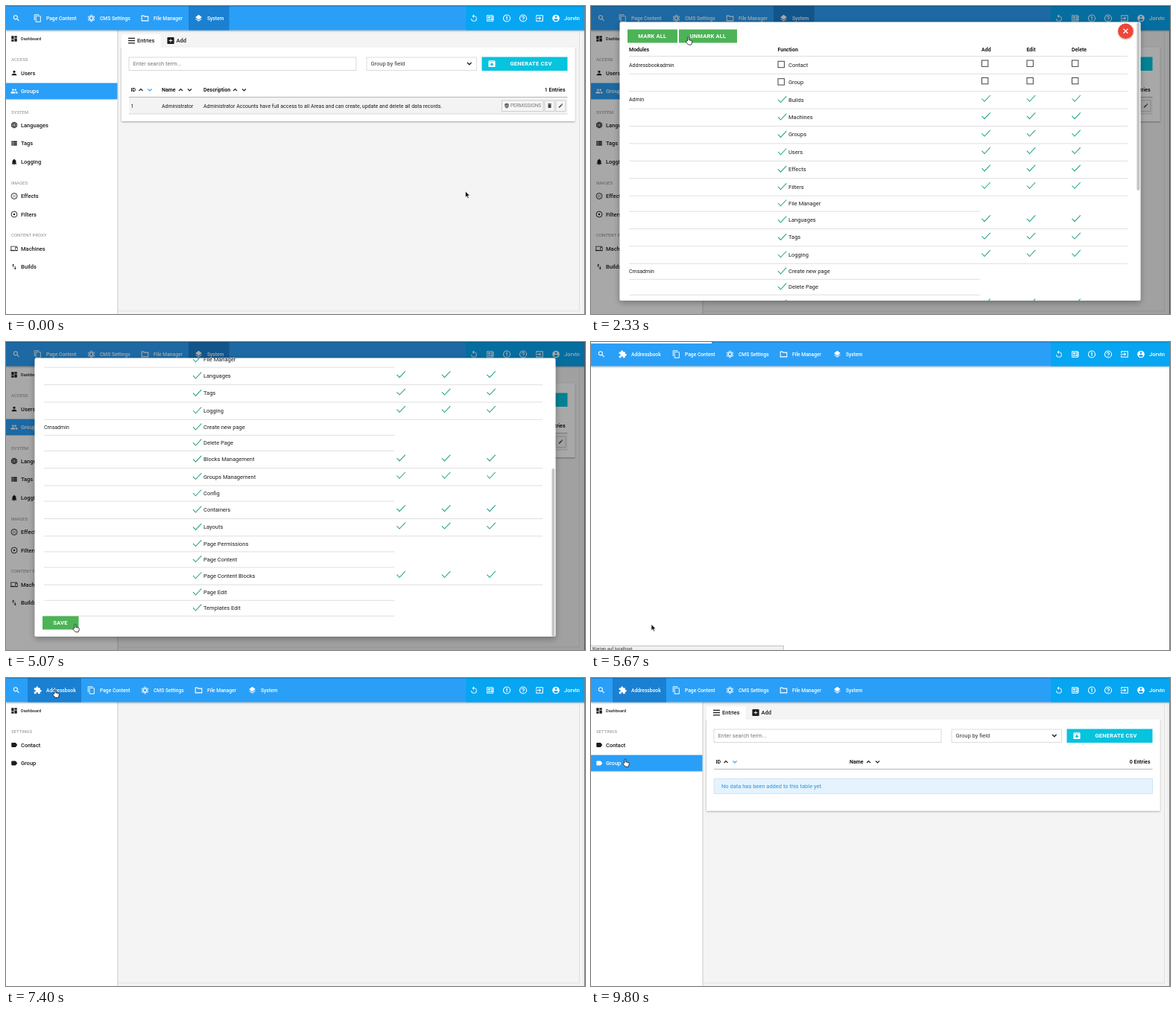
These frames come from a looping animation (777 by 414 pixels, 9870 ms). An HTML page:

```html
<!DOCTYPE html>
<html lang="en">
<head>
<meta charset="utf-8">
<title>Admin permissions</title>
<style>
  html, body { margin: 0; width: 100%; height: 100%; overflow: hidden; background: #fff; }
  svg { display: block; width: 777px; height: 414px; }
  text { font-family: Roboto, "Open Sans", sans-serif; white-space: pre; }
</style>
</head>
<body>
<svg id="stage" viewBox="0 0 777 414" xmlns="http://www.w3.org/2000/svg"></svg>
<script>
const LOOP = 9870;
const BLUE = '#2a9ff7', ACTIVE = '#1a80d2', INK = '#1c1c1c', TEAL = '#25a18c', GREEN = '#4cb356', RULE = '#dcdcdc';

// Icons on a 24 unit grid: "f" parts are filled, "s" parts are stroked.
const ring = r => `M${12 - r} 12a${r} ${r} 0 1 0 ${2 * r} 0a${r} ${r} 0 1 0 ${-2 * r} 0z`;
const ICONS = {
  search: { s: 'M15 9.5a5.5 5.5 0 1 0-11 0a5.5 5.5 0 1 0 11 0zM14 14l6 6' },
  copy: { f: 'M16 1H4a2 2 0 0 0-2 2v14h2V3h12zM19 5H8a2 2 0 0 0-2 2v14a2 2 0 0 0 2 2h11a2 2 0 0 0 2-2V7a2 2 0 0 0-2-2zM19 21H8V7h11z' },
  gear: { f: ring(7.6) + ring(3.4) + 'M9.8 2h4.4l.6 4H9.2zM9.8 22h4.4l.6-4H9.2zM2.2 9l2.2-3.8 3.8 1.5-3 4.8zM21.8 9l-2.2-3.8-3.8 1.5 3 4.8zM2.2 15l2.2 3.8 3.8-1.5-3-4.8zM21.8 15l-2.2 3.8-3.8-1.5 3-4.8z' },
  folder: { s: 'M3 5h6l2 2h10v12H3z' },
  layers: { f: 'M12 16l9-7-9-7-9 7zM12 18.5l-7.4-5.7L3 14l9 7 9-7-1.6-1.2z' },
  puzzle: { f: 'M20.5 11H19V7a2 2 0 0 0-2-2h-4V3.5a2.5 2.5 0 0 0-5 0V5H4a2 2 0 0 0-2 2v3.8h1.5a2.7 2.7 0 0 1 0 5.4H2V20a2 2 0 0 0 2 2h3.8v-1.5a2.7 2.7 0 0 1 5.4 0V22H17a2 2 0 0 0 2-2v-4h1.5a2.5 2.5 0 0 0 0-5z' },
  replay: { f: 'M12 5V1L7 6l5 5V7a6 6 0 1 1-6 6H4a8 8 0 1 0 8-8z' },
  board: { s: 'M3 4h16v16H3zM19 8h3M19 12h3M19 16h3', f: 'M6 7h5v5H6zM6 14h5v3H6zM13 7h4v3h-4zM13 12h4v5h-4z' },
  one: { s: ring(9.5) + 'M10 9.3l2.4-1.5V17' },
  help: { s: ring(9.5) + 'M9 10a3 3 0 1 1 4.6 2.5Q12 13.5 12 15M12 16.6v1.8' },
  exit: { s: 'M3 9V4h18v16H3v-5M1 12h13M11 8l4 4-4 4' },
  account: { f: ring(10) + 'M12 5a3 3 0 1 1 0 6 3 3 0 0 1 0-6zM12 19.2A7.2 7.2 0 0 1 6 16c0-2 4-3.1 6-3.1s6 1.1 6 3.1a7.2 7.2 0 0 1-6 3.2z' },
  dashboard: { f: 'M3 13h8V3H3zM3 21h8v-6H3zM13 21h8V11h-8zM13 3v6h8V3z' },
  user: { f: 'M8 8a4 4 0 1 0 8 0a4 4 0 1 0-8 0zM4 20v-2c0-2.7 5.3-4 8-4s8 1.3 8 4v2z' },
  group: { f: 'M5 8a3 3 0 1 0 6 0a3 3 0 1 0-6 0zM13 8a3 3 0 1 0 6 0a3 3 0 1 0-6 0zM1 19v-2.5C1 14 5.7 13 8 13s7 1 7 3.5V19zM17 19v-2.5q0-2-1.5-3.4c3 0 7.5 1 7.5 3.4V19z' },
  globe: { s: ring(9) + 'M3 9h18M3 15h18M12 3q-8 9 0 18M12 3q8 9 0 18' },
  list: { f: 'M3 14h4v-4H3zM3 19h4v-4H3zM3 9h4V5H3zM8 14h13v-4H8zM8 19h13v-4H8zM8 5v4h13V5z' },
  bell: { f: 'M12 22a2 2 0 0 0 2-2h-4a2 2 0 0 0 2 2zM18 16v-5c0-3.1-1.6-5.6-4.5-6.3V4a1.5 1.5 0 0 0-3 0v.7C7.6 5.4 6 7.9 6 11v5l-2 2v1h16v-1z' },
  effects: { s: ring(9.5), f: 'M8 8h2v2H8zM14 8h2v2h-2zM8 14h2v2H8zM14 14h2v2h-2zM11 11h2v2h-2z' },
  filters: { s: ring(9.5), f: ring(3) },
  devices: { f: 'M3 6h19V4H1v13H0v3h14v-3H3zM23 8h-8v12h8zM21.5 17h-5v-7h5z' },
  swap: { f: 'M16 17v-7h-2v7h-3l4 4 4-4zM9 3L5 7h3v7h2V7h3z' },
  label: { f: 'M17.6 5.8A2 2 0 0 0 16 5H5a2 2 0 0 0-2 2v10a2 2 0 0 0 2 2h11q1 0 1.6-.8L22 12z' },
  menu: { f: 'M2 4h20v2.5H2zM2 11h20v2.5H2zM2 18h20v2.5H2z' },
  add: { f: 'M4 2h16a2 2 0 0 1 2 2v16a2 2 0 0 1-2 2H4a2 2 0 0 1-2-2V4a2 2 0 0 1 2-2zM11 7v4H7v2h4v4h2v-4h4v-2h-4V7z' },
  save: { f: 'M5 2h14l3 3v15a2 2 0 0 1-2 2H4a2 2 0 0 1-2-2V5zM5 4v1.5h14V4zM10 9v4H6l6 6 6-6h-4V9z' },
  shield: { f: 'M12 1L3 5v6c0 5.5 3.8 10.7 9 12 5.2-1.3 9-6.5 9-12V5zM10 17l-4-4 1.4-1.4 2.6 2.6 6.6-6.6L18 9z' },
  trash: { f: 'M6 19a2 2 0 0 0 2 2h8a2 2 0 0 0 2-2V7H6zM19 4h-3.5l-1-1h-5l-1 1H5v2h14z' },
  pencil: { f: 'M3 17.2V21h3.8L17.8 9.9l-3.7-3.7zM20.7 7a1 1 0 0 0 0-1.4l-2.3-2.3a1 1 0 0 0-1.4 0l-1.8 1.8 3.7 3.7z' },
};

const icon = (name, cx, cy, size, color) => {
  const { f, s } = ICONS[name];
  return `<g transform="translate(${cx} ${cy}) scale(${size / 24}) translate(-12 -12)">` +
    (f ? `<path d="${f}" fill="${color}" fill-rule="evenodd"/>` : '') +
    (s ? `<path d="${s}" fill="none" stroke="${color}" stroke-width="2.2"/>` : '') + '</g>';
};
const text = (str, x, cy, size = 7, color = INK, weight = 400, extra = '') =>
  `<text x="${x}" y="${cy + size * .36}" font-size="${size}" fill="${color}" font-weight="${weight}" ${extra}>${str}</text>`;
const rect = (x, y, x2, y2, fill, extra = '') =>
  `<rect x="${x}" y="${y}" width="${x2 - x}" height="${y2 - y}" fill="${fill}" ${extra}/>`;
const frame = (x, y, x2, y2, fill, color) =>
  rect(x + .5, y + .5, x2 - .5, y2 - .5, fill, `stroke="${color}" stroke-width=".8"`);
const stroke = (d, color, width = 1) => `<path d="${d}" fill="none" stroke="${color}" stroke-width="${width}"/>`;
const group = (id, body) => `<g id="${id}">${body}</g>`;

// Top bar
const navItems = [['puzzle', 'Addressbook'], ['copy', 'Page Content'], ['gear', 'CMS Settings'], ['folder', 'File Manager'], ['layers', 'System']];
const navMenu = items => items.map(([ic, name], i) => {
  const x = 29 + i * 72;
  return icon(ic, x + 13.5, 16.5, 11.5, '#fff') + text(name, x + 25, 16.5, 6.7, '#fff', 500);
}).join('');
const topBar = rect(0, 0, 777, 32.5, BLUE, 'filter="url(#soft)"') + rect(617, 0, 777, 32.5, '#06a6f2');
const topIcons = icon('search', 14, 16.5, 11, '#fff') +
  ['replay', 'board', 'one', 'help', 'exit', 'account'].map((n, i) => icon(n, 628 + i * 22, 16.5, 11.5, '#fff')).join('') +
  text('Jorvin', 749, 16.5, 7.5, '#fff', 500) + rect(0, 0, 777, 1, 'rgba(0,0,0,.18)');

// Sidebar
const heading = (name, y) => text(name, 7, y, 6.05, '#8a8a8a');
const sideRow = (ic, name, y, color = INK) => icon(ic, 11, y, 10, color) + text(name, 20, y, 7.5, color, 500);
const activeRow = (ic, name, y) => rect(0, y - 11, 149.5, y + 11, BLUE) + sideRow(ic, name, y, '#fff');
const systemSide =
  heading('ACCESS', 72) + sideRow('user', 'Users', 90) + activeRow('group', 'Groups', 114.5) +
  heading('SYSTEM', 143) + sideRow('globe', 'Languages', 160) + sideRow('list', 'Tags', 184.5) + sideRow('bell', 'Logging', 209.5) +
  heading('IMAGES', 238) + sideRow('effects', 'Effects', 255.5) + sideRow('filters', 'Filters', 280) +
  heading('CONTENT PROXY', 308) + sideRow('devices', 'Machines', 326) + sideRow('swap', 'Builds', 350.5);
const bookSide = heading('SETTINGS', 72) + sideRow('label', 'Contact', 90) + sideRow('label', 'Group', 114.5);

// Listing card
const sorter = (x, color = INK) =>
  stroke(`M${x - 2.5} 114l2.5-2.5 2.5 2.5`, INK, 1.1) + stroke(`M${x + 9.5} 111.5l2.5 2.5 2.5-2.5`, color, 1.1);
const column = (name, x, sortX, color) => text(name, x, 112.5, 7, INK, 700) + sorter(sortX, color);
const tool = (x, x2) => frame(x, 126.5, x2, 142, '#f6f6f6', '#c4c4c4');
const card = (bottom, entries, body) =>
  rect(155, 55.5, 763.5, bottom, '#fff', 'filter="url(#soft)"') + rect(155, 38, 207.5, 57, '#fff') +
  icon('menu', 168.5, 46.5, 11, INK) + text('Entries', 176, 46.5, 7.5, INK, 500) +
  icon('add', 221, 46.5, 11, INK) + text('Add', 228.5, 46.5, 7.5, INK, 500) +
  frame(164.5, 68.5, 470.5, 87, '#fff', '#cfcfcf') + text('Enter search term...', 170.5, 77.5, 7.5, '#777') +
  frame(483.5, 68.5, 632, 87, '#fff', '#d4d4d4') + text('Group by field', 489.5, 77.5, 7.5, '#333') +
  stroke('M619 76l2.8 2.8 2.8-2.8', INK, 1.3) +
  rect(638.5, 68.5, 753.5, 87, '#06c3de') + icon('save', 652, 77.5, 11, '#fff') +
  text('GENERATE CSV', 676.5, 77.5, 7.5, '#fff', 700, 'letter-spacing=".22"') +
  column('ID', 167.5, 181, BLUE) + text(entries + ' Entries', 750.5, 112.5, 7, INK, 700, 'text-anchor="end"') +
  stroke('M165 122.5H753.5', '#b5b5b5') + body;
const groupsCard = card(155, 1,
  column('Name', 209, 234.5) + column('Description', 265, 307.5) +
  rect(165, 123, 753.5, 145, '#f3f3f3') + stroke('M165 145H753.5', '#d8d8d8') +
  text('1', 167.5, 134) + text('Administrator', 209, 134) +
  text('Administrator Accounts have full access to all Areas and can create, update and delete all data records.', 265, 134) +
  tool(665, 721.5) + icon('shield', 672, 134, 7.5, '#666') + text('PERMISSIONS', 677, 134, 6.4, '#777') +
  tool(722.5, 736.5) + icon('trash', 729.5, 134, 8, '#444') +
  tool(737.5, 751.5) + icon('pencil', 744.5, 134, 7.5, '#444'));
const emptyCard = card(178.5, 0,
  column('Name', 347, 372.5) + frame(164.5, 135, 754, 156, '#e5f3fd', '#c3e2f7') +
  text('No data has been added to this table yet.', 175, 145.5, 7.5, '#2394e6'));

// Permissions dialog; a leading "-" marks rows without add, edit and delete.
const permissions = {
  Addressbookadmin: ['Contact', 'Group'],
  Admin: ['Builds', 'Machines', 'Groups', 'Users', 'Effects', 'Filters', '-File Manager', 'Languages', 'Tags', 'Logging'],
  Cmsadmin: ['-Create new page', '-Delete Page', 'Blocks Management', 'Groups Management', '-Config', 'Containers', 'Layouts',
    '-Page Permissions', '-Page Content', 'Page Content Blocks', '-Page Edit', '-Templates Edit'],
};
const tick = (x, y) => stroke(`M${x} ${y + .5}l3.5 3.8 7.8-8.3`, TEAL, 1.05);
const box = (x, y) => rect(x, y - 4.2, x + 8.4, y + 4.2, 'none', 'stroke="#444" stroke-width="1"');
const button = (label, x, x2, textX, y) => rect(x, y - 9, x2, y + 9, GREEN) +
  text(label, textX, y, 7.5, '#fff', 700, 'letter-spacing=".2"');

function permissionRows() {
  let out = '', top = 67.4;
  for (const [module, names] of Object.entries(permissions)) {
    names.forEach((raw, i) => {
      const short = raw[0] === '-', height = short ? 21 : 23.4, y = top + height / 2;
      const marks = mark => mark(251, y - .6) + (short ? '' : [524.5, 585, 645.5].map(x => mark(x, y - 1.9)).join(''));
      if (!i) out += text(module, 51, y);
      out += text(raw.replace('-', ''), 265, y, 7.5);
      out += module === 'Addressbookadmin'
        ? `<g class="open">${marks(box)}</g><g class="done">${marks(tick)}</g>` : marks(tick);
      top += height;
      out += stroke(`M51 ${top + .5}H${short ? 521.5 : 720}`, RULE, .9);
    });
  }
  return out;
}
const dialogBody = button('MARK ALL', 49, 116, 63.3, 40.5) + button('UNMARK ALL', 118, 196, 132.7, 40.5) +
  '<circle cx="717.5" cy="33.7" r="10.3" fill="#f04537" filter="url(#soft)"/>' + stroke('M714.5 30.7l6 6m0-6l-6 6', '#fff', 1.3) +
  [['Modules', 51], ['Function', 250.5], ['Add', 524], ['Edit', 584.5], ['Delete', 645]].map(([n, x]) => text(n, x, 58.5, 7, INK, 700)).join('') +
  stroke('M51 67.5H720', RULE, .9) + permissionRows() + button('SAVE', 49, 97.5, 63.3, 619.5);

const stage = document.getElementById('stage');
stage.innerHTML =
  `<defs><filter id="soft" x="-5%" y="-20%" width="110%" height="150%"><feDropShadow dx="0" dy="1" stdDeviation="1" flood-opacity=".35"/></filter>
   <filter id="deep" x="-5%" y="-10%" width="110%" height="120%"><feDropShadow dx="0" dy="3" stdDeviation="4" flood-opacity=".3"/></filter>
   <clipPath id="view"><rect x="38.5" y="21.5" width="699" height="374.5" rx="2"/></clipPath></defs>` +
  rect(0, 0, 777, 414, '#fff') +
  group('frame', rect(150, 32, 777, 414, '#f4f4f4') + stroke('M150 32V414', '#d9d9d9', 1.4) +
    stroke('M151 410H769.5V36', '#dedede', .9) + stroke('M774.5 32V414', '#e6e6e6', .8) +
    group('hover', rect(0, 0, 149.5, 22, '#f2f6fe')) +
    icon('dashboard', 11, 44, 10, INK) + text('Dashboard', 20, 44.3, 5.6, INK, 500)) +
  group('systemSide', systemSide) + group('bookSide', bookSide) +
  group('contactOn', activeRow('label', 'Contact', 90)) + group('groupOn', activeRow('label', 'Group', 114.5)) +
  group('groupsCard', groupsCard) + group('emptyCard', emptyCard) +
  topBar + rect(0, 0, 0, 32.5, ACTIVE, 'id="activeTab"') +
  group('oldNav', navMenu(navItems.slice(1))) + group('newNav', navMenu(navItems)) + topIcons +
  rect(776, 0, 777, 414, '#7b7f82') +
  group('loading', rect(0, 0, 162, 2, '#fff', 'id="progress"') + frame(-1, 408, 259, 416, '#f1f1f1', '#b8b8b8') +
    text('Warten auf localhost', 1.5, 412.3, 5.9, '#333')) +
  group('dialog', rect(0, 0, 777, 414, 'rgba(0,0,0,.34)') + rect(38.5, 21.5, 737.5, 396, '#fff', 'rx="2" filter="url(#deep)"') +
    `<g clip-path="url(#view)">${group('scroller', dialogBody)}</g>` + rect(732.5, 22, 736.3, 248, '#c4c4c4', 'id="thumb" rx="1.9"')) +
  group('cursor', `<path id="arrow" d="M0 0V8.2l1.9-1.7 1.3 2.9 1.4-.6-1.3-2.8h2.6z" fill="#111" stroke="#fff" stroke-width=".6"/>
    <path id="hand" d="M-1 5V.8a.9.9 0 0 1 1.8 0V3.8l3.6.9q1 .3.9 1.5l-.5 2.4-.7 1.7H.2L-3 6.8q-.5-1.3.7-1.2z" fill="#fff" stroke="#111" stroke-width=".8"/>`);

const el = id => document.getElementById(id);
const show = (node, on) => { node.style.display = on ? '' : 'none'; };
const within = (t, a, b) => t >= a && t < b;
const ramp = (t, a, b) => Math.min(1, Math.max(0, (t - a) / (b - a)));
const ease = p => p * p * (3 - 2 * p);

// Pointer stops: time, x, y
const route = [[0, 616.5, 249], [330, 616.5, 249], [930, 693, 133], [1500, 693, 133], [2270, 130.5, 41.8], [2400, 130.5, 41.8],
  [2650, 92, 40], [2930, 92, 40], [3800, 93, 379.5], [5200, 93, 379.5], [5600, 81, 379.5], [6070, 81, 379.5], [6470, 79, 44],
  [6800, 66, 16], [7500, 66, 16], [8130, 45, 87], [8870, 45, 87], [9270, 46, 109], [LOOP, 46, 109]];
function pointer(t) {
  const i = Math.max(1, route.findIndex(stop => stop[0] > t));
  const [t0, x0, y0] = route[i - 1], [t1, x1, y1] = route[i], p = ease(ramp(t, t0, t1));
  return [x0 + (x1 - x0) * p, y0 + (y1 - y0) * p];
}

function render(t) {
  const reloaded = t >= 5400, blank = within(t, 5400, 5860), book = t >= 7130;
  show(el('frame'), !blank);
  show(el('loading'), blank);
  el('progress').setAttribute('width', 162 * ramp(t, 5400, 5600));
  show(el('oldNav'), !reloaded);
  show(el('newNav'), reloaded);
  show(el('activeTab'), !blank);
  el('activeTab').setAttribute('x', book ? 29 : reloaded ? 317 : 245);
  el('activeTab').setAttribute('width', book ? 72 : 54.5);

  show(el('systemSide'), !blank && !book);
  show(el('groupsCard'), !blank && !book);
  show(el('bookSide'), book);
  show(el('contactOn'), within(t, 8200, 9460));
  show(el('groupOn'), t >= 9460);
  show(el('emptyCard'), within(t, 8600, 9460) || t >= 9600);

  const onUsers = within(t, 6300, 6540), onDashboard = within(t, 6540, 6730) || within(t, 7760, 8400);
  show(el('hover'), onUsers || onDashboard);
  el('hover').setAttribute('transform', `translate(0 ${onUsers ? 79 : 33})`);

  const open = ramp(t, 1130, 1400) * (1 - ramp(t, 5070, 5330));
  const scroll = ease(ramp(t, 2930, 3670));
  show(el('dialog'), open > 0);
  el('dialog').setAttribute('opacity', open);
  el('scroller').setAttribute('transform', `translate(0 ${-242 * scroll})`);
  el('thumb').setAttribute('y', 22 + 148 * scroll);
  stage.querySelectorAll('.open').forEach(node => show(node, t < 2730));
  stage.querySelectorAll('.done').forEach(node => show(node, t >= 2730));

  const [x, y] = pointer(t);
  const hand = within(t, 800, 1500) || within(t, 2200, 2930) || within(t, 3730, 5070) || t >= 6270;
  el('cursor').setAttribute('transform', `translate(${x} ${y})`);
  show(el('hand'), hand);
  show(el('arrow'), !hand);
}

// The picture advances 15 times per second.
const start = performance.now();
function loop() {
  const t = (performance.now() - start) % LOOP;
  render(Math.floor((t + 5) * .015) / .015);
  requestAnimationFrame(loop);
}
loop();
</script>
</body>
</html>
```
